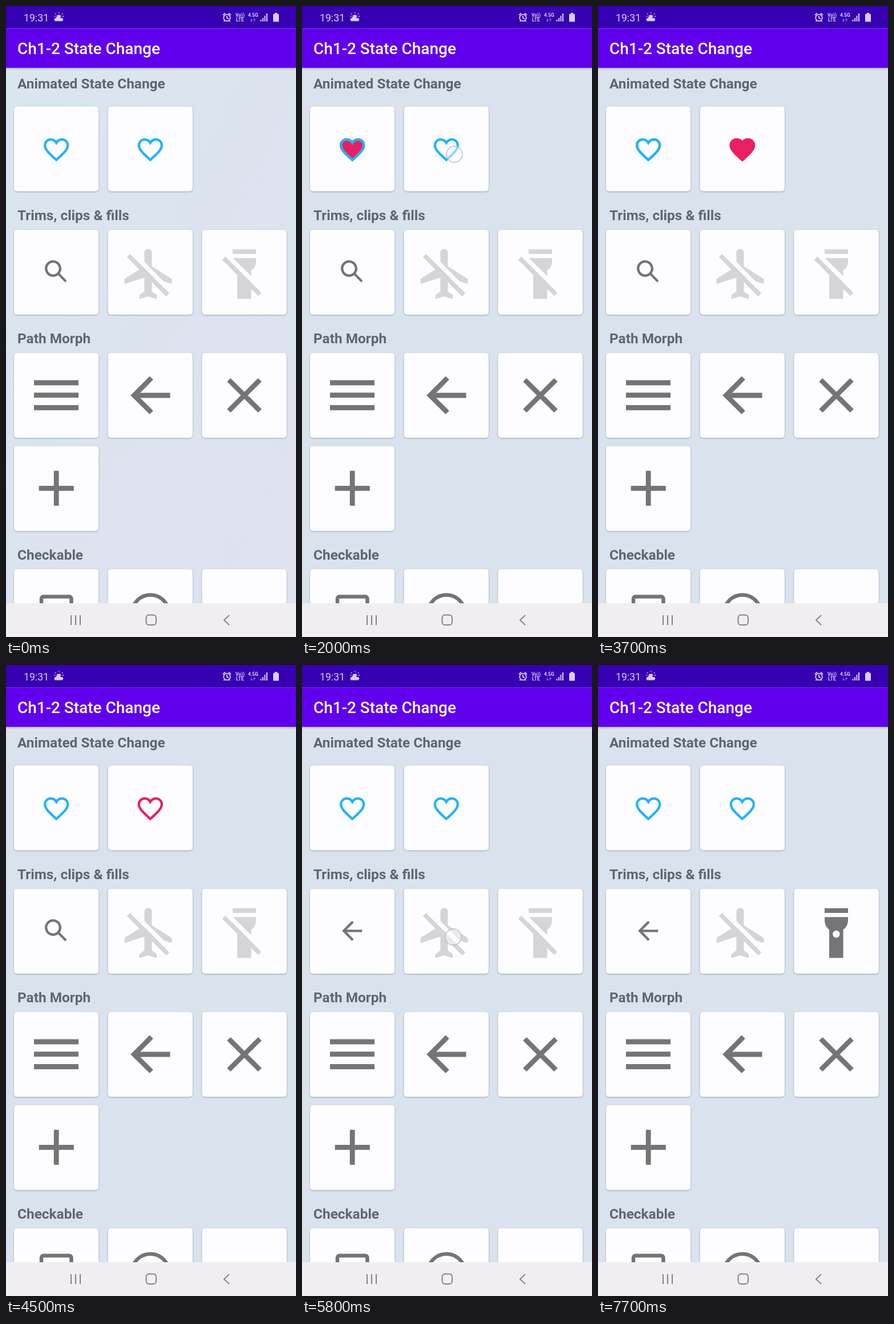
Animation, 508 px wide and 1102 px high, one loop 8 s. Source, as an HTML page:

```html
<!DOCTYPE html>
<html lang="en">
<head>
<meta charset="utf-8">
<title>State Change</title>
<style>
  html, body { margin: 0; width: 100%; height: 100%; overflow: hidden; background: #dae2ed; }
  svg { display: block; width: 100%; height: 100%; }
  text { font-family: Roboto, "Liberation Sans", sans-serif; }
  .head { font-size: 24.4px; font-weight: 700; fill: #60666e; }
  .card { fill: #fdfdff; filter: drop-shadow(0 1px 1.5px rgba(50, 70, 100, .36)); }
  .line { fill: none; stroke: #757376; stroke-width: 8.8; }
  .thin { fill: none; stroke: #757376; stroke-width: 4.3; }
  .heart { fill: none; stroke-width: 1.9; }
  .status { fill: #d9cdf2; }
  .tiny { font-size: 8.4px; font-weight: 700; }
  .nav { fill: none; stroke: #858387; stroke-width: 2; }
</style>
</head>
<body>
<svg viewBox="0 0 508 1102" preserveAspectRatio="none">
  <defs>
    <linearGradient id="tint" x1="0" y1="0" x2="1" y2="1">
      <stop offset="0" stop-color="#d8e7ef"/>
      <stop offset=".5" stop-color="#dce3ef"/>
      <stop offset="1" stop-color="#dfe2f1"/>
    </linearGradient>
    <linearGradient id="barShade" x1="0" y1="0" x2="0" y2="1">
      <stop offset="0" stop-color="#5a6590" stop-opacity=".3"/>
      <stop offset="1" stop-color="#5a6590" stop-opacity="0"/>
    </linearGradient>
    <path id="heartShape" d="M12 21.35l-1.45-1.32C5.4 15.36 2 12.28 2 8.5 2 5.42 4.42 3 7.5 3c1.74 0 3.41.81 4.5 2.09C13.09 3.81 14.76 3 16.5 3 19.58 3 22 5.42 22 8.5c0 3.78-3.4 6.86-8.55 11.54L12 21.35z"/>
    <path id="heartLine" d="M12 20L11.2 19.3C6.3 14.8 3 11.9 3 8.5C3 6 5 4 7.5 4C9.3 4 11.1 5 12 6.6C12.9 5 14.7 4 16.5 4C19 4 21 6 21 8.5C21 11.9 17.7 14.8 12.8 19.3Z"/>
    <clipPath id="level1"><rect id="fill1" x="-10" width="44" height="60"/></clipPath>
    <clipPath id="level2"><rect id="fill2" x="-10" width="44" height="60"/></clipPath>
    <clipPath id="leftHalf"><path d="M0 0H12V8L10.5 11L13 14L11.5 17L12 23H0Z"/></clipPath>
    <clipPath id="rightHalf"><path d="M24 0H12V8L10.5 11L13 14L11.5 17L12 23H24Z"/></clipPath>
  </defs>

  <rect width="508" height="1102" fill="#dae2ed"/>
  <rect id="wash" width="508" height="1102" fill="url(#tint)"/>
  <rect y="108" width="508" height="4" fill="url(#barShade)"/>
  <g id="cards"></g>

  <text class="head" x="20" y="144">Animated State Change</text>
  <text class="head" x="20" y="373.5">Trims, clips &amp; fills</text>
  <text class="head" x="20" y="588.5">Path Morph</text>
  <text class="head" x="20" y="966.5">Checkable</text>

  <g transform="translate(61.5 224.3) scale(2.225)">
    <g clip-path="url(#level1)" fill="#e91e63">
      <use id="whole1" href="#heartShape"/>
      <g id="broken">
        <g id="leftPart"><use href="#heartShape" clip-path="url(#leftHalf)"/></g>
        <g id="rightPart"><use href="#heartShape" clip-path="url(#rightHalf)"/></g>
      </g>
    </g>
    <use id="outline1" class="heart" href="#heartLine" stroke="#22b2f8"/>
    <g id="traced" class="heart" stroke="#22b2f8">
      <path id="traceLeft" d="M12 20L11.2 19.3C6.3 14.8 3 11.9 3 8.5C3 6 5 4 7.5 4C9.3 4 11.1 5 12 6.6"/>
      <path id="traceRight" d="M12 20L12.8 19.3C17.7 14.8 21 11.9 21 8.5C21 6 19 4 16.5 4C14.7 4 12.9 5 12 6.6"/>
    </g>
  </g>

  <g transform="translate(226.1 224.3) scale(2.225)">
    <use href="#heartShape" clip-path="url(#level2)" fill="#e91e63"/>
    <use id="outline2" class="heart" href="#heartLine"/>
  </g>

  <g class="thin">
    <path id="lens" d="M91.2 467.2A12.3 12.3 0 1 1 91.21 467.19"/>
    <path id="stem" d="M91.2 467.2L105 481C114 490 121 464.3 105.5 464.3H73.5"/>
    <path id="tip" d="M89.2 448.2L73.2 464.3L89.2 480.4"/>
  </g>

  <g transform="translate(198.7 415.5) scale(4.37)">
    <path id="plane" d="M21 16v-2l-8-5V3.5c0-.83-.67-1.5-1.5-1.5S10 2.67 10 3.5V9l-8 5v2l8-2.5V19l-2 1.5V22l3.5-1 3.5 1v-1.5L13 19v-5.5l8 2.5z"/>
    <path id="planeGap" stroke="#fdfdff" stroke-width="1.8"/>
    <path id="planeSlash" stroke-width="1.8"/>
  </g>

  <g>
    <path id="torch" d="M397 424.8H438V433H397ZM397 440.3H438V445C438 453 434.5 459 429.6 462V511.6H405V462C400.5 459 397 453 397 445Z"/>
    <circle cx="417.4" cy="470" r="6.2" fill="#fdfdff"/>
    <path id="torchGap" stroke="#fdfdff" stroke-width="8"/>
    <path id="torchSlash" stroke-width="7.8"/>
  </g>

  <g class="line">
    <path d="M49 658H127M49 679.7H127M49 701.5H127"/>
    <path d="M228 680H287.5M254.7 649.5L224.5 680L254.7 710"/>
    <path d="M390.3 653L444.7 707M444.7 653L390.3 707"/>
    <path d="M57.7 842.3H118.8M88.2 811.8V872.8"/>
    <rect x="62" y="1031.5" width="52.5" height="52" rx="3.5" stroke-width="6.5"/>
    <circle cx="253" cy="1061" r="32.5" stroke-width="6.5"/>
  </g>

  <rect width="508" height="39.5" fill="#3700b3"/>
  <rect y="39.5" width="508" height="68.5" fill="#6100ed"/>
  <text x="20" y="84" font-size="28" font-weight="500" fill="#fff">Ch1-2 State Change</text>

  <g class="status">
    <text x="31" y="27" font-size="17.8">19:31</text>
    <path d="M88 18a5 5 0 0 1 9 0l-3 2zM86 26.5a3 3 0 0 1 1-5.6a5 4.6 0 0 1 9 0a3 2.8 0 0 1 2 5.6z"/>
    <path d="M92.7 10.5v2M86 13l1.5 1.6M99.5 13l-1.6 1.6M84.5 18h2M99 18h2" stroke="#d9cdf2" stroke-width="1.3"/>
    <g fill="none" stroke="#d9cdf2" stroke-width="1.8">
      <circle cx="387" cy="20.5" r="5.8"/>
      <path d="M387 17v4l3 1.4M380 16l4-3.5M394 16l-4-3.5M381.5 27l1.8-1.8M392.5 27l-1.8-1.8"/>
    </g>
    <text class="tiny" x="402" y="19">Vo))</text>
    <text class="tiny" x="403" y="27">LTE</text>
    <text class="tiny" x="424" y="19">4.5G</text>
    <path d="M430 27v-5m-2 3l2 2 2-2M435 22v5m-2-3l2-2 2 2" fill="none" stroke="#a58ad9" stroke-width="1"/>
    <path d="M445.5 24h2v3h-2zM449 21h2v6h-2zM452.5 17h2v10h-2zM456 13h2v14h-2z"/>
    <path d="M470.5 12h5v2h1.7q.8 0 .8.8V26.500q0 1-.8 1h-8.400q-.8 0-.8-1V14.800q0-.8.8-.8h1.700z"/>
  </g>

  <rect y="1043" width="508" height="59" fill="#f0eef1"/>
  <g class="nav">
    <path d="M114 1064V1081M122 1064V1081M130 1064V1081"/>
    <rect x="245.500" y="1063.500" width="17.500" height="17.500" rx="5"/>
    <path d="M391 1064L382 1072.500L391 1081"/>
  </g>

  <circle id="touch" r="14" fill="#fff" fill-opacity=".5" stroke="#b9b8d8" stroke-opacity=".8" stroke-width="1.8"/>
</svg>

<script>
const LOOP = 8000;
const BLUE = '#22b2f8', PINK = '#e91e63';

// press time, release time, x, y
const TAPS = [
  [200, 380, 100, 262],
  [2000, 2180, 267, 259],
  [2850, 3030, 101, 260],
  [3800, 3980, 266, 260],
  [4700, 4880, 100, 474],
  [5800, 5940, 265, 475],
  [6600, 6710, 258, 459],
  [7130, 7290, 428, 474]
];

const $ = id => document.getElementById(id);
const set = (id, attrs) => {
  const el = $(id);
  for (const key in attrs) el.setAttribute(key, attrs[key]);
};
const show = (id, on) => set(id, { visibility: on ? 'visible' : 'hidden' });
const mix = (a, b, p) => a + (b - a) * p;
const span = (t, a, b) => Math.min(1, Math.max(0, (t - a) / (b - a)));
const cubic = (a, b, u) => 3 * a * u * (1 - u) ** 2 + 3 * b * u * u * (1 - u) + u ** 3;

// cubic-bezier(.4, 0, .2, 1), solved by bisection
function ease(x) {
  let lo = 0, hi = 1;
  for (let i = 0; i < 16; i++) {
    const mid = (lo + hi) / 2;
    if (cubic(0.4, 0.2, mid) < x) lo = mid; else hi = mid;
  }
  return cubic(0, 1, (lo + hi) / 2);
}

function addCards() {
  const columns = [14, 178.8, 343.5];
  const rows = [[175.5, 2], [391, 3], [606, 3], [768.7, 1], [983.5, 3]];
  for (const [y, count] of rows) {
    for (const x of columns.slice(0, count)) {
      const card = document.createElementNS('http://www.w3.org/2000/svg', 'rect');
      const box = { x, y, width: 148, height: 148, rx: 5, class: 'card' };
      for (const key in box) card.setAttribute(key, box[key]);
      $('cards').append(card);
    }
  }
}

function trim(id, from, to) {
  const length = $(id).getTotalLength();
  const dash = Math.max(0, to - from) * length;
  set(id, { 'stroke-dasharray': `0 ${from * length} ${dash} ${length * 2}` });
  show(id, dash > 0.01);
}

function slash(id, x, y, size, p) {
  set(id, { d: `M${x} ${y}l${size * p} ${size * p}` });
  show(id, p > 0.001);
}

function drawHeart1(t) {
  const fill = ease(span(t, 420, 1250));
  const crack = span(t, 3000, 3420);
  const trace = span(t, 3400, 3770);
  const fall = ease(crack);
  set('fill1', { y: fill === 1 ? -10 : mix(21.4, 3, fill) });
  show('whole1', fill > 0 && crack === 0);
  show('broken', crack > 0 && crack < 1);
  set('broken', { opacity: 1 - span(crack, 0.35, 1) });
  set('leftPart', { transform: `translate(${-2 * fall} ${2 * fall}) rotate(${-22 * fall} 12 21)` });
  set('rightPart', { transform: `translate(${2 * fall} ${2 * fall}) rotate(${22 * fall} 12 21)` });
  show('outline1', fill < 1 || trace === 1);
  const tracing = trace > 0 && trace < 1;
  trim('traceLeft', 0, tracing ? trace : 0);
  trim('traceRight', 0, tracing ? trace : 0);
}

function drawHeart2(t) {
  const level = ease(span(t, 2150, 2780)) - ease(span(t, 3950, 4460));
  set('fill2', { y: mix(21.4, 3, level) });
  set('outline2', { stroke: t >= 2750 && t < 4580 ? PINK : BLUE });
}

function drawSearch(t) {
  const p = ease(span(t, 4850, 5350));
  const length = $('stem').getTotalLength();
  trim('lens', ease(span(t, 4850, 5150)), 1);
  trim('stem', mix(0, 1 - 32 / length, p), mix(19.5 / length, 1, p));
  const head = ease(span(t, 5100, 5400));
  trim('tip', 0.5 - head / 2, 0.5 + head / 2);
}

const grey = p => `rgb(${mix(117, 213, p)},${mix(116, 212, p)},${mix(118, 215, p)})`;

function drawPlane(t) {
  const back = t >= 6600;
  const time = back ? span(t, 6635, 6935) : 1 - span(t, 5870, 6190);
  const p = back ? ease(time) : 1 - ease(1 - time);
  const color = grey(time);
  set('plane', { fill: color });
  set('planeSlash', { stroke: color });
  slash('planeSlash', 3.635, 4.635, 15.73, p);
  slash('planeGap', 4.91, 3.36, 15.73, p);
}

function drawTorch(t) {
  const off = span(t, 7260, 7660);
  const color = grey(1 - off);
  const p = 1 - ease(off);
  set('torch', { fill: color });
  set('torchSlash', { stroke: color });
  slash('torchSlash', 381.5, 440.5, 63.2, p);
  slash('torchGap', 387, 435, 63.2, p);
}

function drawTouch(t) {
  const tap = TAPS.find(([down, up]) => t >= down && t < up + 110);
  show('touch', tap);
  if (tap) set('touch', { cx: tap[2], cy: tap[3], opacity: 1 - span(t, tap[1], tap[1] + 110) });
}

function draw(t) {
  set('wash', { opacity: 1 - span(t, 200, 900) });
  drawHeart1(t);
  drawHeart2(t);
  drawSearch(t);
  drawPlane(t);
  drawTorch(t);
  drawTouch(t);
}

addCards();
const start = performance.now();
function tick() {
  draw((performance.now() - start) % LOOP);
  requestAnimationFrame(tick);
}
tick();
</script>
</body>
</html>
```
